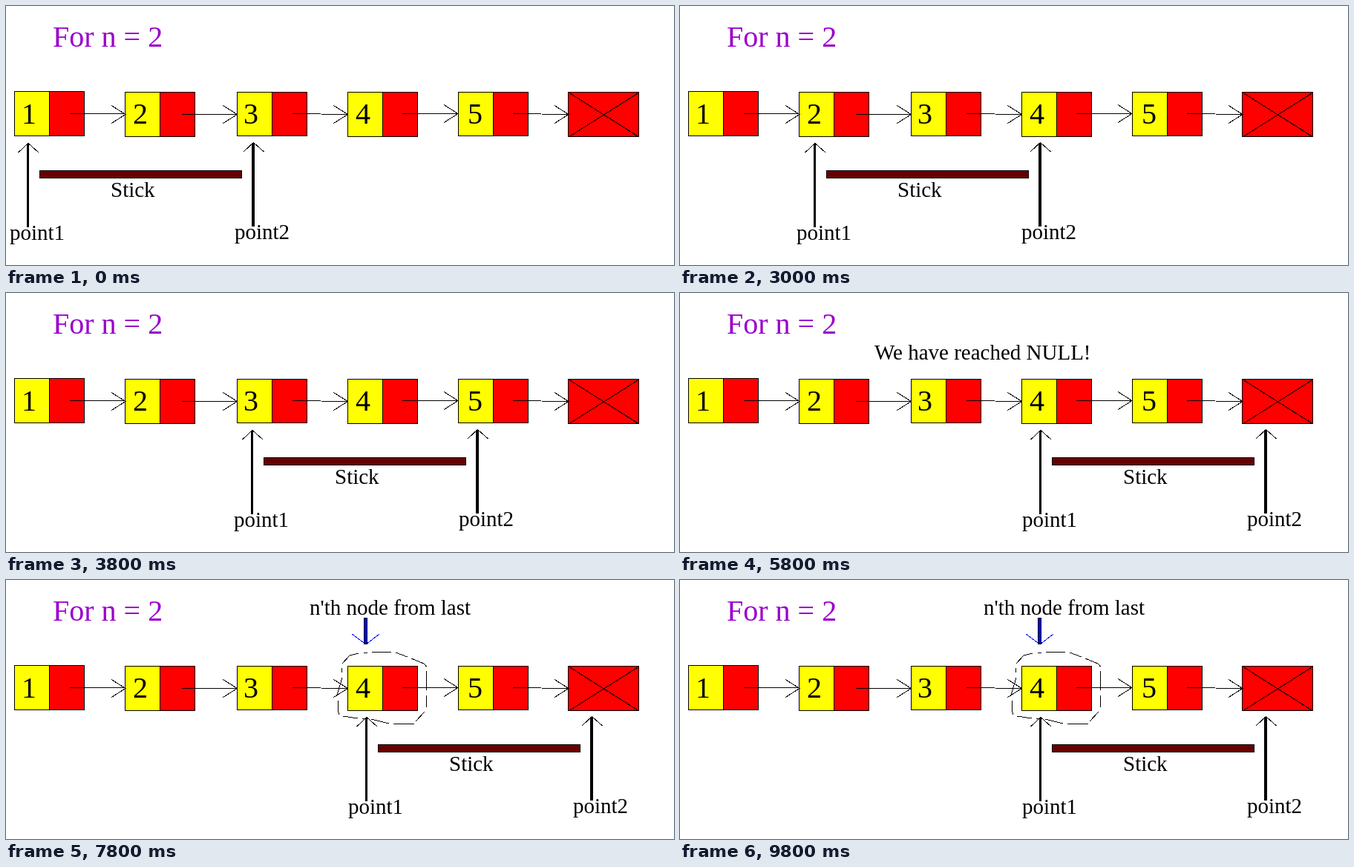
Write an HTML page that moves like this. It is 900x350 px and loops after 10 s.

```html
<!DOCTYPE html>
<html lang="en">
<head>
<meta charset="utf-8">
<title>Nth node from the end of a linked list</title>
<style>
  html, body { margin: 0; width: 100%; height: 100%; overflow: hidden; background: #fff; }
  svg { display: block; width: 900px; height: 350px; }
  text { font: 29px "Liberation Serif", "Times New Roman", serif; }
  .title, .digit { font-size: 40px; }
  .title { fill: #90c; }
  .line { fill: none; stroke: #000; }
  rect, .line { shape-rendering: crispEdges; }
  .cell { height: var(--cell, 60px); stroke: #000; }
  .short { --cell: 59px; }

  .pointers, .reached, .found { animation: 10s step-end infinite; }
  .pointers { animation-name: advance; }
  .reached { animation-name: reached; }
  .found { animation-name: found; }

  @keyframes advance {
    0% { transform: translateX(0); }
    18% { transform: translateX(152px); }
    38% { transform: translateX(302px); }
    58%, 100% { transform: translateX(456px); }
  }
  @keyframes reached {
    0% { visibility: hidden; }
    58% { visibility: visible; }
    78%, 100% { visibility: hidden; }
  }
  @keyframes found {
    0% { visibility: hidden; }
    78%, 100% { visibility: visible; }
  }
</style>
</head>
<body>
<svg viewBox="0 0 900 350">
  <defs>
    <g id="node">
      <rect class="cell" x=".5" y=".5" width="47" fill="#ff0"/>
      <rect class="cell" x="47.5" y=".5" width="47" fill="#f00"/>
    </g>
    <path id="tip" class="line" d="M-19-12L0 0L-19 12"/>
    <path id="head" class="line" d="M-13.5 13L0 .5L14 13"/>
  </defs>

  <text class="title" x="63" y="55">For n = 2</text>

  <use href="#node" x="11" y="115"/>
  <use href="#node" x="160" y="116"/>
  <use href="#node" class="short" x="311" y="116"/>
  <use href="#node" x="460" y="116"/>
  <use href="#node" class="short" x="609" y="116"/>
  <rect x="757.5" y="116.5" width="95" height="60" fill="#f00" stroke="#000"/>
  <path class="line" d="M759 117.5L852 176.5M759 176.5L852 117.5"/>

  <text class="digit" x="21" y="159">1</text>
  <text class="digit" x="171" y="159">2</text>
  <text class="digit" x="320" y="159">3</text>
  <text class="digit" x="471" y="159">4</text>
  <text class="digit" x="622" y="159">5</text>

  <path class="line" d="M86 145.5H161M237 146.5H311M386 145.5L461 146.5M534 145.5H609M683 145.5L758 146.5"/>
  <use href="#tip" x="161" y="146.5"/>
  <use href="#tip" x="311.5" y="146.5"/>
  <use href="#tip" x="460.5" y="146.5"/>
  <use href="#tip" x="609" y="145.5"/>
  <use href="#tip" x="758" y="146.5"/>

  <g class="pointers">
    <rect x="28" y="186" width="3" height="113"/>
    <use href="#head" x="30" y="185"/>
    <text x="5" y="316">point1</text>
    <rect x="331" y="185" width="4" height="113"/>
    <use href="#head" x="333.5" y="184"/>
    <text x="308" y="315">point2</text>
    <rect x="45.5" y="222.5" width="272" height="10" fill="#600" stroke="#000"/>
    <text x="141" y="258">Stick</text>
  </g>

  <text class="reached" x="262" y="90">We have reached NULL!</text>

  <g class="found">
    <text x="409" y="47">n'th node from last</text>
    <path class="line" style="stroke:#00f" d="M466 73L485 87L503 73"/>
    <rect x="482.5" y="51.5" width="4" height="35" fill="#00f" stroke="#000"/>
    <path class="line" d="M453 113L463 102L475 99M482 98L487 98M493 97.5H519M525 98L541 104M546 106L563 113L566.5 117
      M566.5 123V149M566.5 156V172M564 178L552 191M550 194.5H522M516 194L492 188M486 187L480 187M474 187L454 184
      M449 182L447.5 178V163M445.5 157L453 132M453 125L452 119"/>
  </g>
</svg>
</body>
</html>
```
